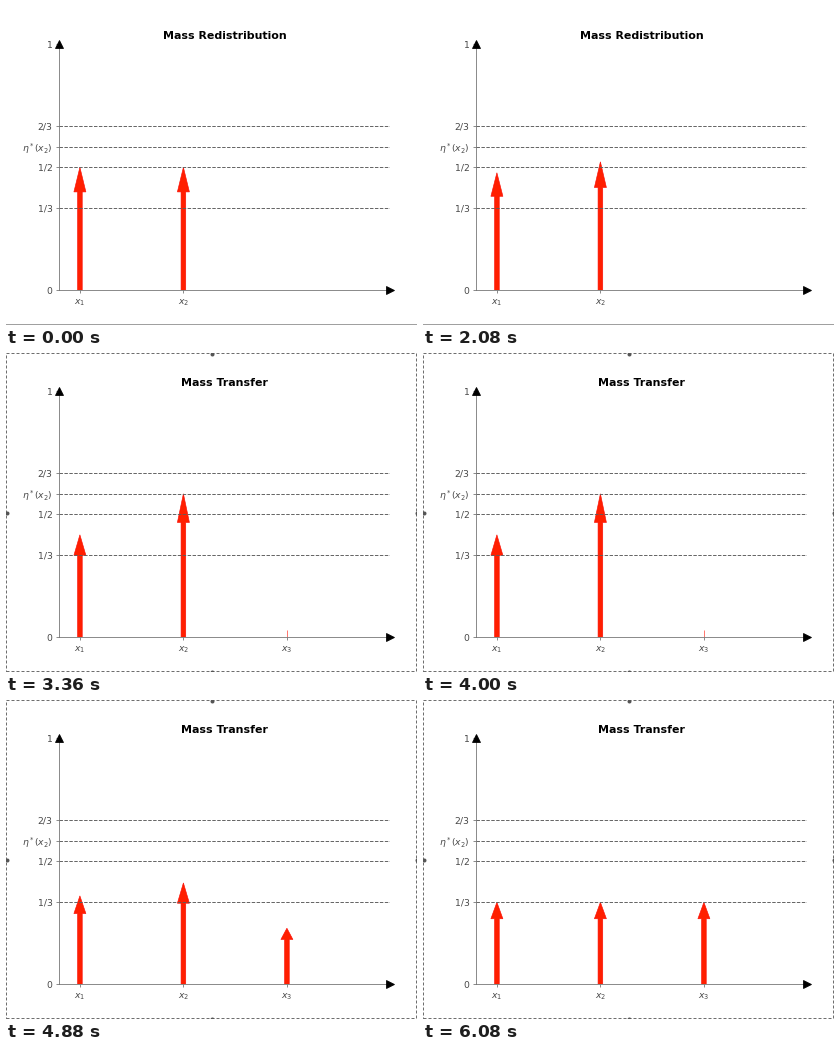
Animation, 411 px wide and 319 px high, one loop 6160 ms. Source, as a matplotlib script:

```python
import matplotlib.pyplot as plt
import numpy as np
from matplotlib.animation import FuncAnimation
from matplotlib.lines import Line2D
from matplotlib.patches import Polygon

W, H, DPI = 411, 319, 64
PX = 72 / DPI                      # points per pixel
STEP, FRAMES = 80, 77
RED, RIM = "#ff1f00", "#fb0d06"
LABEL, AXIS, DASH, EDGE = "#484848", "#707070", "#5c5c5c", "#6e6e6e"
LEFT, RIGHT, BOTTOM, TOP = 53.2, 384.4, 284.45, 38.1

# Mass at x1, x2, x3 in each stage
START = np.array([1 / 2, 1 / 2, 0])
SHIFTED = np.array([5 / 12, 7 / 12, 0])
EQUAL = np.full(3, 1 / 3)
SHIFT = (1760, 2960)
SPLIT = (4085, 5246)
FRAME_ON, TRANSFER_ON = 2560, 3200

fig = plt.figure(figsize=(W / DPI, H / DPI), dpi=DPI, facecolor="white")
ax = fig.add_axes([LEFT / W, 1 - BOTTOM / H, (RIGHT - LEFT) / W, (BOTTOM - TOP) / H])
ax.set(xlim=(0.8, 4), ylim=(0, 1))
ax.spines[["top", "right"]].set_visible(False)
for side in ("left", "bottom"):
    ax.spines[side].set(linewidth=0.8 * PX, color=AXIS)

levels = [1 / 3, 1 / 2, 7 / 12, 2 / 3]
ax.set_yticks([0, *levels, 1], ["0", "1/3", "1/2", r"$\eta^*(x_2)$", "2/3", "1"])
ax.tick_params(length=3.3 * PX, width=0.8 * PX, pad=3.2 * PX,
               labelsize=9.3 * PX, color=AXIS, labelcolor=LABEL)
ax.tick_params(axis="x", pad=3.8 * PX)
for y in levels:
    ax.axhline(y, color=DASH, lw=0.93 * PX, ls="--")

tips = dict(color="black", ms=8.8 * PX, mew=0.8 * PX, clip_on=False, zorder=4)
ax.plot(1, 0, ">", transform=ax.transAxes, **tips)
ax.plot(0, 1, "^", transform=ax.transAxes, **tips)
title = ax.set_title("", fontsize=11 * PX, fontweight="bold", pad=5.4 * PX)

arrows = [ax.add_patch(Polygon(np.zeros((7, 2)), fc=RED, ec=RIM, lw=0.6 * PX,
                               joinstyle="miter", zorder=1)) for _ in range(3)]
stub, = ax.plot([3, 3], [0, 0.032], color="#ff6a60", lw=0.9 * PX,
                solid_capstyle="butt")


def overlay(xs, ys, **style):
    """Add a line in stage pixels, measured from the bottom left."""
    line = Line2D(np.array(xs) / W, np.array(ys) / H, transform=fig.transFigure,
                  snap=False, **style)
    return fig.add_artist(line)


base_line = overlay([0, W], [0.5, 0.5], color="#a0a0a0", lw=PX)
border = overlay([0.5, W - 0.5, W - 0.5, 0.5, 0.5], [0.5, 0.5, H - 0.5, H - 0.5, 0.5],
                 color=EDGE, lw=PX, ls=(0, (3, 2)))
handles = overlay([W / 2, W / 2, 0.5, W - 0.5], [0.5, H - 0.5, H / 2, H / 2],
                  color="#555555", ls="none", marker="o", ms=4 * PX, mew=0)


def arrow_points(x, length):
    neck = 0.8 * length
    half, head = 0.0225, 0.058
    return [(x - half, 0), (x - half, neck), (x - head, neck), (x, length),
            (x + head, neck), (x + half, neck), (x + half, 0)]


def progress(t, span):
    return np.clip((t - span[0]) / (span[1] - span[0]), 0, 1)


def draw(i):
    t = i * STEP
    mass = START + (SHIFTED - START) * progress(t, SHIFT)
    mass = mass + (EQUAL - SHIFTED) * progress(t, SPLIT)
    for k, (arrow, m) in enumerate(zip(arrows, mass)):
        arrow.set_xy(arrow_points(k + 1, m))
        arrow.set_visible(m > 0)

    transfer = t >= TRANSFER_ON
    title.set_text("Mass Transfer" if transfer else "Mass Redistribution")
    shown = range(1, 4 if transfer else 3)
    ax.set_xticks(list(shown), [f"$x_{k}$" for k in shown])
    stub.set_visible(transfer and mass[2] == 0)

    framed = t >= FRAME_ON
    base_line.set_visible(not framed)
    border.set_visible(framed)
    handles.set_visible(framed)
    return []


anim = FuncAnimation(fig, draw, frames=FRAMES, interval=STEP, repeat=True,
                     repeat_delay=0, blit=False)
plt.show()
```
